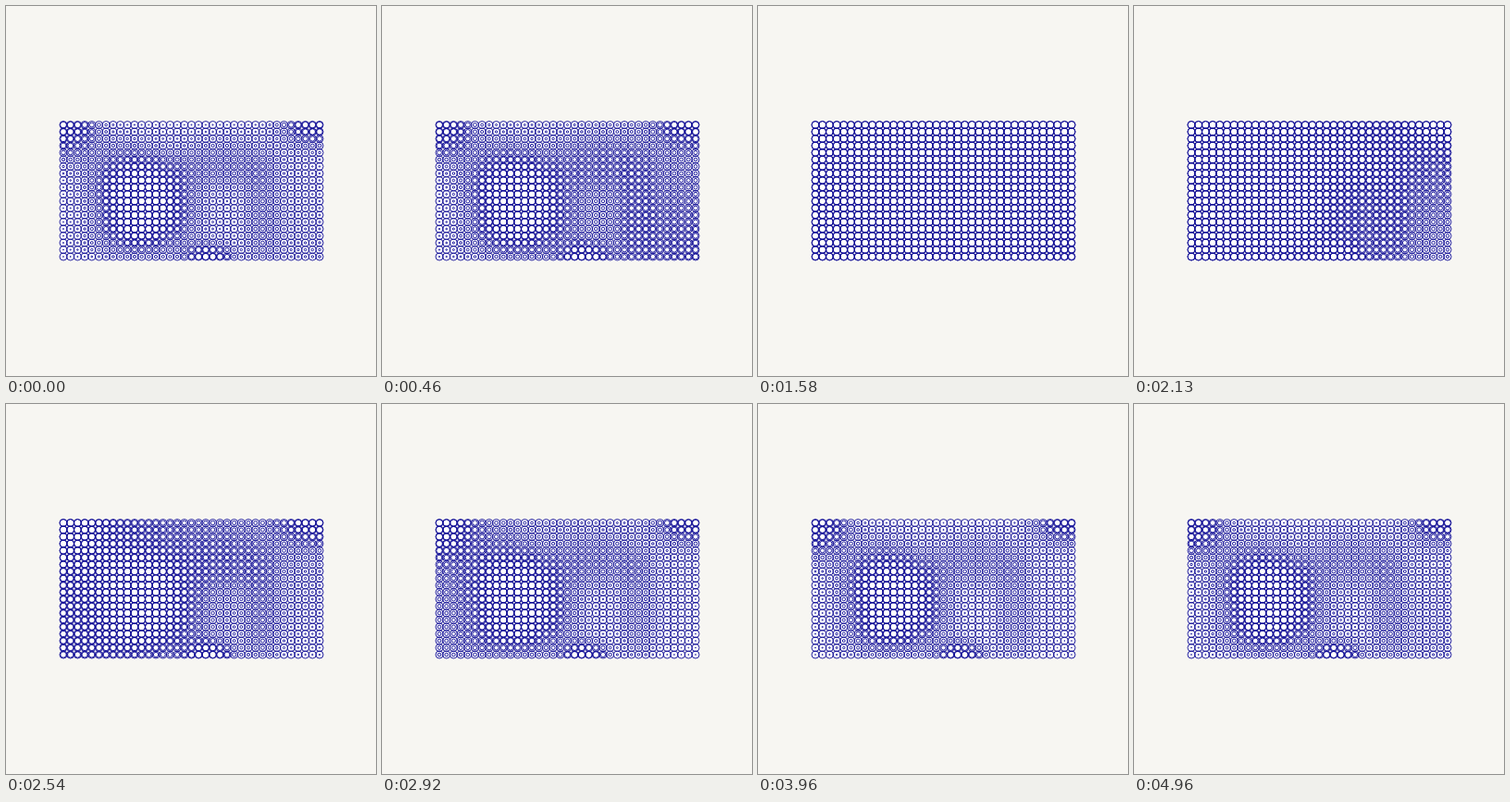
An HTML page with a canvas for the animation above (5 s loop, 400 px wide and 400 px high).

```html
<!DOCTYPE html>
<html lang="en">
<head>
<meta charset="utf-8">
<title>Ring field</title>
<style>
  html, body { margin: 0; width: 100%; height: 100%; overflow: hidden; background: #f7f6f2; }
  canvas { display: block; width: 400px; height: 400px; }
</style>
</head>
<body>
<canvas id="stage" width="400" height="400"></canvas>
<script>
const ctx = document.getElementById('stage').getContext('2d');
const TAU = Math.PI * 2;
const LOOP = 5000, PEAK = 1100, LAG = 3.15;
const COLS = 37, ROWS = 20, R = 4;
const LEFT = 62, RIGHT = 339, TOP = 128.5, BOTTOM = 271;

// Soft hills of the resting field: x, y, height, spread x, spread y, tilt
const hills = [
  [147, 209, 3.6, 64, 50, Math.PI / 4],
  [60, 125, 3, 43, 43, 0],
  [337, 122, 3, 44, 32, 0],
  [220, 275, 3, 28, 20, 0],
  [235, 170, 1.5, 60, 30, 0],
  [278, 228, 1.3, 22, 58, 0],
  [115, 252, 1, 42, 24, 0]
];

function hill(x, y, [cx, cy, h, sx, sy, tilt]) {
  const dx = x - cx, dy = y - cy, c = Math.cos(tilt), s = Math.sin(tilt);
  const d = Math.hypot((dx * c + dy * s) / sx, (dy * c - dx * s) / sy);
  return h * Math.exp(-(d ** 3));
}

function restRadius(x, y) {
  return Math.min(R, hills.reduce((sum, h) => sum + hill(x, y, h), 0.4));
}

const cells = [];
for (let j = 0; j < ROWS; j++) {
  for (let i = 0; i < COLS; i++) {
    const x = LEFT + (RIGHT - LEFT) * i / (COLS - 1);
    const y = TOP + (BOTTOM - TOP) * j / (ROWS - 1);
    const lag = LAG * Math.hypot(RIGHT - x, BOTTOM - y);
    cells.push({ x, y, lag, rest: restRadius(x, y) });
  }
}

function ease(p, g) {
  return p < 0.5 ? 0.5 * (2 * p) ** g : 1 - 0.5 * (2 - 2 * p) ** g;
}

// Swell that travels outward from the lower right corner
function swell(ms) {
  const q = 0.5 + 0.5 * Math.cos(TAU * ms / LOOP);
  return ease(q ** 2.3, 1.25);
}

function circle(x, y, r) {
  ctx.moveTo(x + r, y);
  ctx.arc(x, y, r, 0, TAU);
}

function draw(t) {
  ctx.fillStyle = '#f7f6f2';
  ctx.fillRect(0, 0, 400, 400);

  ctx.beginPath();
  for (const c of cells) circle(c.x, c.y, R);
  ctx.fillStyle = '#fff';
  ctx.fill();

  ctx.beginPath();
  for (const c of cells) {
    circle(c.x, c.y, R);
    circle(c.x, c.y, c.rest + (R - c.rest) * swell(t - PEAK - c.lag));
  }
  ctx.strokeStyle = '#0c0894';
  ctx.lineWidth = 0.9;
  ctx.stroke();
}

function frame() {
  draw(performance.now() % LOOP);
  requestAnimationFrame(frame);
}
frame();
</script>
</body>
</html>
```
